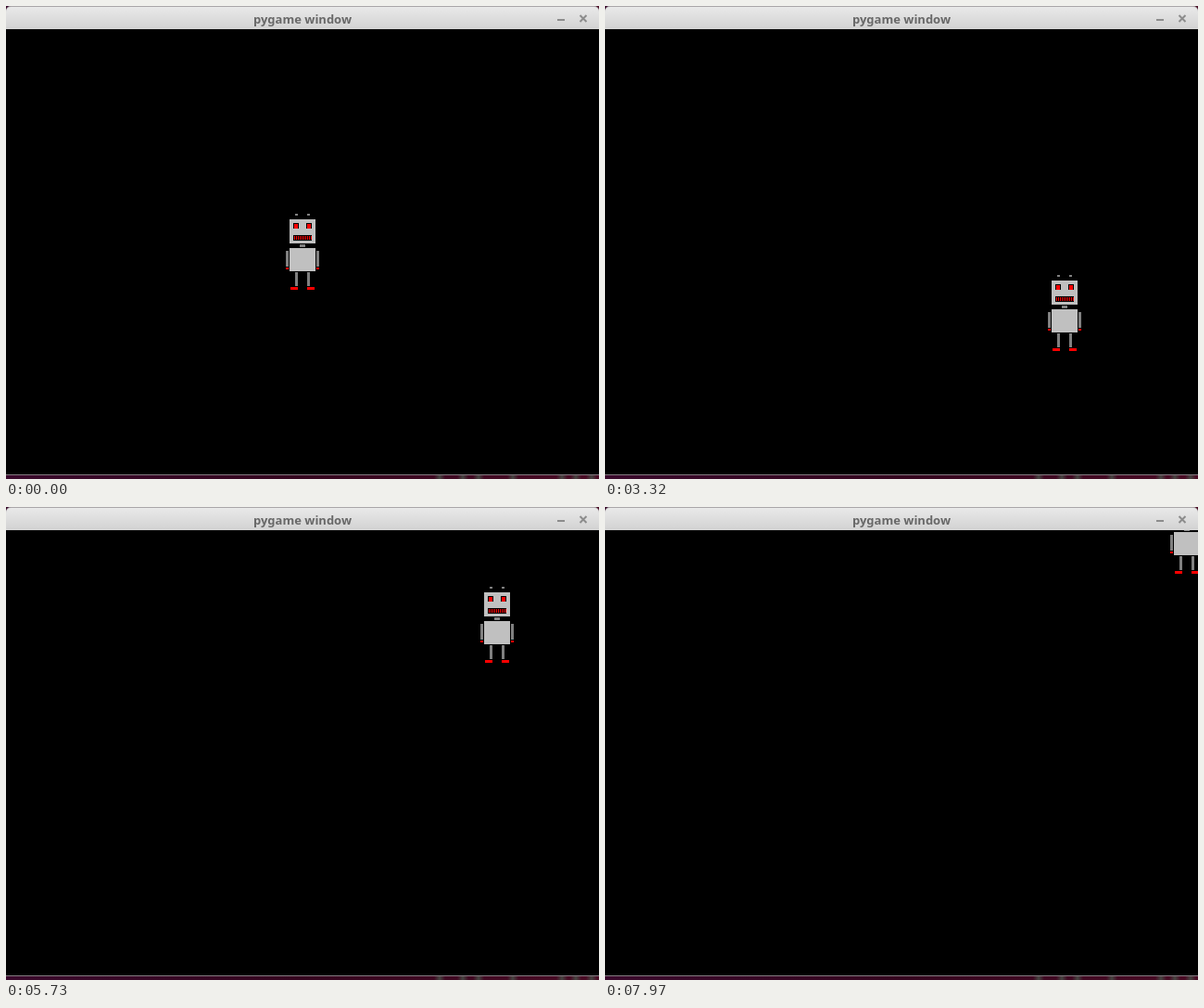
Animation of 640x510 px, one loop 8000 ms. Source, as an HTML page with a canvas:

```html
<!DOCTYPE html>
<html lang="en">
<head>
<meta charset="utf-8">
<title>pygame window</title>
<style>
  html, body { margin: 0; width: 100%; height: 100%; overflow: hidden; background: #000; }
  canvas { display: block; }
</style>
</head>
<body>
<canvas id="stage" width="640" height="510"></canvas>
<script>
const ctx = document.getElementById('stage').getContext('2d');
const W = 640, H = 510, TOP = 25, BOTTOM = 505;
const LOOP = 8000, STEP = 48;
const HOME = { x: 302, y: 224 };

// Each key press moves the robot along one axis, from its first step to its last
const MOVES = [
  { from: 1290, to: 1800, x: 72 },
  { from: 1890, to: 2150, y: 34 },
  { from: 2200, to: 2980, x: 104 },
  { from: 3140, to: 3500, y: 58 },
  { from: 3660, to: 3860, x: 34 },
  { from: 4050, to: 5120, y: -152 },
  { from: 5180, to: 6260, y: -156 },
  { from: 6310, to: 6690, y: -52 },
  { from: 6890, to: 7600, x: 98 },
  { from: 7700, to: 7970, y: 34 }
];

// Share of a move done at time t, in even steps
function progress(t, from, to) {
  if (t < from) return 0;
  if (t >= to) return 1;
  const gaps = Math.round((to - from) / STEP);
  return (1 + Math.floor((t - from) / (to - from) * gaps + 1e-6)) / (gaps + 1);
}

// The robot only ever moves by whole ticks of two pixels
const snap = v => 2 * Math.round(v / 2);

function position(t) {
  let { x, y } = HOME;
  for (const { from, to, x: dx = 0, y: dy = 0 } of MOVES) {
    const p = progress(t, from, to);
    x += snap(dx * p);
    y += snap(dy * p);
  }
  return [x, y];
}

function rect(color, x, y, w, h) {
  ctx.fillStyle = color;
  ctx.fillRect(x, y, w, h);
}

function gradient(x0, y0, x1, y1, ...colors) {
  const g = ctx.createLinearGradient(x0, y0, x1, y1);
  colors.forEach((c, i) => g.addColorStop(i / (colors.length - 1), c));
  return g;
}

function drawDesktop() {
  rect(gradient(0, 0, W, 0, '#3a0a2c', '#35051f', '#4a0c25'), 0, 0, W, H);
  rect('#857a81', 0, BOTTOM, W, 1);
  for (const x of [462, 487, 504, 541, 594, 609, 626]) {
    rect(gradient(x, 0, x + 12, 0, '#46464200', '#464642', '#46464200'), x, 506, 12, 4);
  }
}

function drawTitleBar() {
  const bar = (fill, y) => {
    ctx.beginPath();
    ctx.roundRect(0, y, W, 40, 5);
    ctx.fillStyle = fill;
    ctx.fill();
  };
  bar('#a9a6a8', 0);
  bar(gradient(0, 1, 0, TOP, '#e9e9e9', '#d2d2d2'), 1);

  ctx.font = 'bold 13px "Noto Sans", "Open Sans", sans-serif';
  ctx.textAlign = 'center';
  ctx.fillStyle = '#686868';
  ctx.fillText('pygame window', W / 2, 19);

  rect('#8c8c8c', 595, 14, 8, 2);
  ctx.strokeStyle = '#8c8c8c';
  ctx.lineWidth = 2;
  ctx.beginPath();
  for (const side of [-3.5, 3.5]) {
    ctx.moveTo(623 + side, 10);
    ctx.lineTo(623 - side, 17);
  }
  ctx.stroke();
}

function drawRobot(x, y) {
  const gray = '#808080', silver = '#c0c0c0', red = '#f00';
  const box = (c, dx, dy, w, h) => rect(c, x + dx, y + dy, w, h);
  const pair = (c, left, right, dy, w, h) => {
    box(c, left, dy, w, h);
    box(c, right, dy, w, h);
  };

  pair(gray, 10, 23, 0, 3, 2);      // antennas
  box(silver, 4, 6, 28, 26);        // head
  pair('#000', 8, 22, 10, 6, 6);    // eyes
  pair(red, 9, 23, 11, 4, 5);
  box('#000', 8, 23, 20, 6);        // mouth
  for (let dx = 9; dx < 28; dx += 2) box(red, dx, 24, 1, 4);
  box(gray, 15, 33, 6, 3);          // neck
  box(silver, 4, 37, 28, 25);       // body
  pair(gray, 0, 33, 40, 3, 17);     // arms
  pair(red, 0, 33, 58, 3, 2);
  pair(gray, 10, 23, 63, 3, 15);    // legs
  pair(red, 5, 23, 79, 8, 3);
}

function draw(t) {
  drawDesktop();
  drawTitleBar();
  rect('#000', 0, TOP, W, BOTTOM - TOP);
  ctx.save();
  ctx.beginPath();
  ctx.rect(0, TOP, W, BOTTOM - TOP);
  ctx.clip();
  drawRobot(...position(t));
  ctx.restore();
}

const start = performance.now();
function tick() {
  draw((performance.now() - start) % LOOP);
  requestAnimationFrame(tick);
}
tick();
</script>
</body>
</html>
```
